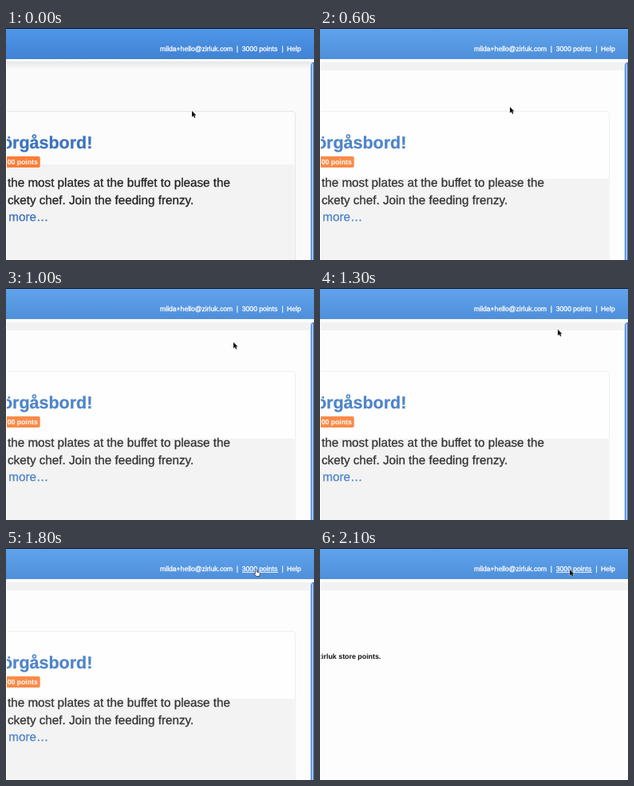
Write an HTML page that moves like this. It is 386 px wide and 291 px high and loops after 4.2 s.

```html
<!DOCTYPE html>
<html lang="en">
<head>
<meta charset="utf-8">
<title>Store points</title>
<style>
  html, body { margin: 0; width: 100%; height: 100%; overflow: hidden; background: #fff; }
  svg { display: block; width: 100%; height: 100%; }
  text { font-family: "Liberation Sans", Arial, sans-serif; text-rendering: geometricPrecision; white-space: pre; }
  .b { font-weight: bold; }
  .end { text-anchor: end; }
  .nav text { font-size: 8.6px; fill: #fff; stroke: #fff; stroke-width: .3px; }
  .copy text { font-size: 15.23px; stroke-width: .3px; }
  .ink { fill: var(--ink); stroke: var(--ink); }
  .link { fill: var(--link); stroke: var(--link); stroke-width: .3px; }
  svg { --top: #61a2ec; --low: #4f8fd9; --page: #fdfdfd; --card: #fefefe; --edge: #efefef;
        --link: #4f85c8; --ink: #343434; --badge: #f98b49; }
  svg.fresh { --top: #4f96e8; --low: #4182d3; --page: #fafafa; --card: #fcfcfc; --edge: #e6e6e6;
        --link: #3d73bd; --ink: #222; --badge: #fd7d38; }
</style>
</head>
<body>
<svg id="stage" viewBox="0 0 386 291" preserveAspectRatio="none">
  <defs>
    <linearGradient id="bar" x2="0" y2="1">
      <stop offset="0" stop-color="var(--top)"/>
      <stop offset="1" stop-color="var(--low)"/>
    </linearGradient>
    <linearGradient id="shade" x2="0" y2="1">
      <stop offset="0" stop-color="#e6e6e6"/>
      <stop offset="1" stop-color="#fafafa"/>
    </linearGradient>
  </defs>

  <rect width="386" height="291" fill="var(--page)"/>
  <rect y="1" width="386" height="38" fill="url(#bar)"/>
  <rect width="386" height="1" fill="#0b0d18"/>
  <rect y="39" width="386" height="3" fill="#fcfcfc"/>
  <rect id="strip" y="43" width="386" height="10" fill="#f2f2f2"/>
  <rect id="shadow" y="42" width="386" height="10" fill="url(#shade)"/>

  <g id="shop">
    <path d="M381 291V46Q381 42 386 41.5V291Z" fill="#e9eef6"/>
    <path d="M382.5 292V47Q382.5 43.5 385.5 43.5V292Z" fill="#9cc3f6" stroke="#4477c4"/>
    <path d="M-5 104.5H358Q362.5 104.5 362.5 109V292H-5Z" fill="var(--card)" stroke="var(--edge)"/>
    <rect id="panel" x="1" y="189" width="360.5" height="140" fill="#f3f3f3"/>
    <text class="b end link" x="108.4" y="151" font-size="21.5">örgåsbord!</text>
    <rect x="-6" y="161" width="48.7" height="14" rx="2" fill="var(--badge)"/>
    <text class="b end" x="39.8" y="171.2" font-size="8.7" fill="#fff">00 points</text>
    <g class="copy">
      <text class="ink" x="2" y="199">the most plates at the buffet to please the</text>
      <text class="ink" x="2" y="220.6">ckety chef. Join the feeding frenzy.</text>
      <text class="link" x="3.3" y="242">more…</text>
    </g>
  </g>

  <text id="store" class="b end" x="76.3" y="139.4" font-size="8.85" fill="#111">zirluk store points.</text>

  <g class="nav">
    <text class="end" x="284.2" y="29.4">milda+hello@zirluk.com</text>
    <text x="288.8" y="29.4">|</text>
    <text x="295.8" y="29.4">3000 points</text>
    <text x="345.4" y="29.4">|</text>
    <text x="352" y="29.4">Help</text>
  </g>
  <rect id="under" x="296" y="30" width="45" height="1" fill="#e6effb"/>

  <path id="arrow" d="M0 0V7.7L1.8 6.1L3 8.8L4.4 8.2L3.2 5.5H5.5Z"
        fill="#111" stroke="#fff" stroke-width=".7" paint-order="stroke"/>
  <path id="hand" d="M0 .8Q1-.5 1.9 .8V3.6L5 4.2Q5.8 4.5 5.7 5.8L5 9H1.4L-1.4 6Q-1.6 4.7-.6 5L0 5.5Z"
        fill="#fff" stroke="#222" stroke-width=".7"/>
  <rect y="39" width="1" height="252" fill="#fff"/>
</svg>
<script>
  const LOOP = 4200, STEP = 100, HOVER = 1800, OPEN = 2100;
  // time, x, y of the pointer tip
  const path = [
    [500, 233, 104], [600, 238, 99], [800, 260, 86], [1000, 285, 68], [1100, 292, 61],
    [1200, 294, 58], [1400, 302, 46], [1600, 310, 35], [1700, 313, 27]
  ];
  const el = id => document.getElementById(id);
  const show = (id, on) => el(id).setAttribute("visibility", on ? "visible" : "hidden");
  const move = (id, x, y) => el(id).setAttribute("transform", `translate(${x} ${y})`);

  function pointerAt(t) {
    if (t <= path[0][0]) return path[0].slice(1);
    const i = path.findIndex(p => p[0] >= t);
    if (i < 0) return path[path.length - 1].slice(1);
    const [t0, x0, y0] = path[i - 1], [t1, x1, y1] = path[i];
    const k = (t - t0) / (t1 - t0);
    return [x0 + (x1 - x0) * k, y0 + (y1 - y0) * k].map(Math.round);
  }

  function draw(ms) {
    const t = Math.floor((ms % LOOP) / STEP) * STEP;
    const fresh = t < STEP, opened = t >= OPEN, hand = t >= HOVER && !opened;
    el("stage").classList.toggle("fresh", fresh);
    el("panel").setAttribute("y", fresh ? 171 : 189);
    show("strip", !fresh);
    show("shadow", fresh);
    show("shop", !opened);
    show("store", opened);
    show("under", t >= HOVER);
    show("hand", hand);
    show("arrow", !hand);
    move("arrow", ...pointerAt(t));
    move("hand", 312.6, 26.6);
  }

  const start = performance.now();
  function tick() {
    draw(performance.now() - start);
    requestAnimationFrame(tick);
  }
  tick();
</script>
</body>
</html>
```
